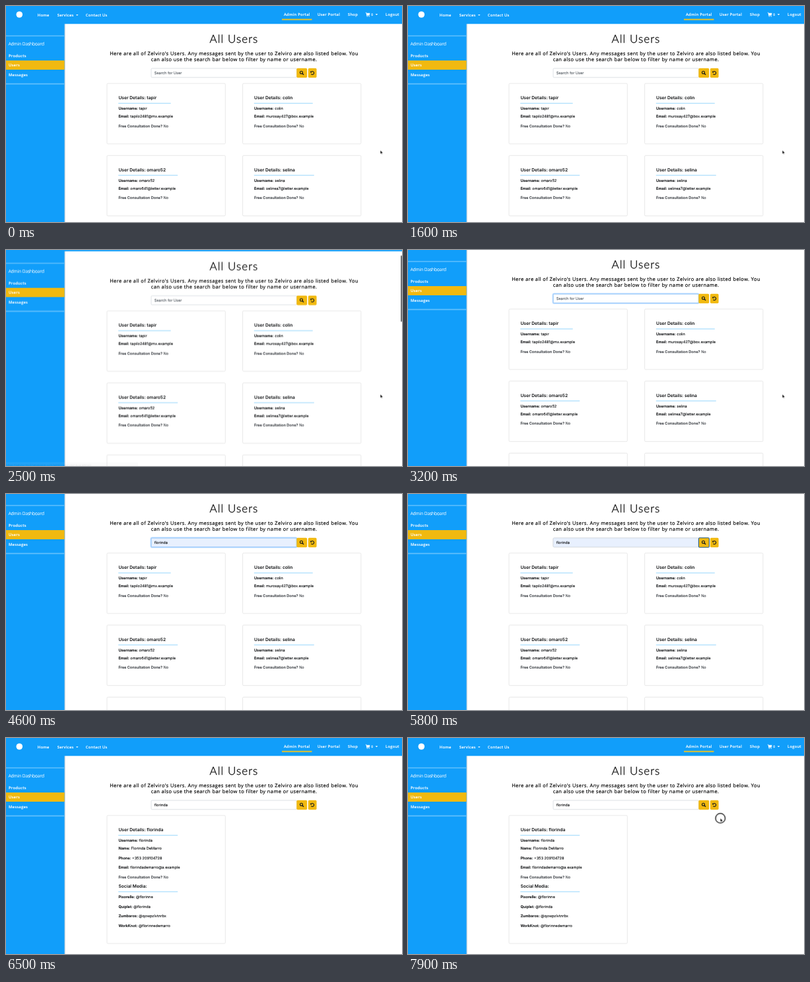
Animation of 600x329 px, one loop 8 s. Source, as an HTML page:

```html
<!DOCTYPE html>
<html lang="en">
<head>
<meta charset="utf-8">
<title>All Users</title>
<style>
  html, body { margin: 0; width: 100%; height: 100%; overflow: hidden; background: #fff; }
  svg { display: block; width: 600px; height: 329px; color: #0c0e10; }
  text {
    font: 5.62px Inter, sans-serif; text-rendering: geometricPrecision;
    fill: currentColor; stroke: currentColor; stroke-width: .1;
  }

  .nav, .side { color: #fff; }
  .nav text, .side text { font: 600 5.83px "Open Sans", sans-serif; letter-spacing: .23px; }
  .side .head { font-weight: 300; font-size: 6.67px; letter-spacing: 0; stroke-width: .18; }
  .nav .count { font-size: 5px; }
  .title { font: 300 17px Lato, sans-serif; letter-spacing: 1.05px; color: #000; stroke-width: .3; text-anchor: middle; }
  .intro { font: 7.5px "Open Sans", sans-serif; letter-spacing: .4px; color: #000; stroke-width: .16; text-anchor: middle; }
  .card rect { fill: #fff; stroke: #dfdfdf; stroke-width: .7; }
  .card line { stroke: #7accfb; stroke-width: .8; }
  .card .h { font-size: 6.7px; font-weight: 600; stroke-width: 0; }
  .b { font-weight: 600; }
  .muted { color: #3d4046; }
  .hint { color: #565d64; }
  .url { font-size: 4.2px; color: #333; }

  .anim, .anim * { animation-duration: 8s; animation-iteration-count: infinite; }
  .step { animation-timing-function: step-end; }
  #page { animation-name: scroll; }
  #thumb { animation-name: thumb; }
  #bar { animation-name: bar; }
  #status { animation-name: status; }
  #list { animation-name: list; }
  #single { animation-name: single; }
  #hint { animation-name: hint; }
  #one { animation-name: one; }
  #two { animation-name: two; }
  #full { animation-name: full; }
  #autofill { animation-name: autofill; }
  #focus { animation-name: focus; }
  #pressed { animation-name: pressed; }
  #pointer { animation-name: pointer; }
  #move { animation-name: move; }
  #ring { animation-name: ring; }

  @keyframes scroll {
    0%, 24.6% { transform: translateY(0); animation-timing-function: ease-in-out; }
    33.1% { transform: translateY(-28px); }
    75% { transform: translateY(-28px); animation-timing-function: step-start; }
    75.01%, 100% { transform: translateY(0); }
  }
  @keyframes thumb {
    0%, 24.6% { transform: translateY(0); animation-timing-function: ease-in-out; }
    33.1%, 100% { transform: translateY(8.6px); }
  }
  @keyframes bar {
    0% { opacity: 0; animation-timing-function: step-end; }
    23.75%, 36% { opacity: 1; }
    39%, 100% { opacity: 0; }
  }
  @keyframes status {
    0% { opacity: 0; animation-timing-function: step-end; }
    23.75%, 29% { opacity: 1; }
    32.5%, 100% { opacity: 0; }
  }
  @keyframes list { 0% { opacity: 1; } 75%, 100% { opacity: 0; } }
  @keyframes single { 0% { opacity: 0; } 75%, 100% { opacity: 1; } }
  @keyframes hint { 0% { opacity: 1; } 46.25%, 100% { opacity: 0; } }
  @keyframes one { 0% { opacity: 0; } 46.25% { opacity: 1; } 50%, 100% { opacity: 0; } }
  @keyframes two { 0% { opacity: 0; } 50% { opacity: 1; } 56.25%, 100% { opacity: 0; } }
  @keyframes full { 0% { opacity: 0; } 56.25%, 100% { opacity: 1; } }
  @keyframes autofill { 0% { opacity: 0; } 56.25% { opacity: 1; } 75%, 100% { opacity: 0; } }
  @keyframes focus {
    0%, 35% { opacity: 0; }
    36.9%, 71.2% { opacity: 1; }
    72.4%, 100% { opacity: 0; }
  }
  @keyframes pressed { 0% { opacity: 0; } 71.25% { opacity: 1; } 75%, 100% { opacity: 0; } }
  @keyframes pointer { 0% { opacity: 1; } 46.25% { opacity: 0; } 88%, 100% { opacity: 1; } }
  @keyframes ring { 0% { opacity: 0; } 88%, 100% { opacity: 1; } }
  @keyframes move {
    0%, 88.5% { transform: translate(567.2px, 219.8px); animation-timing-function: cubic-bezier(.3, 0, .3, 1); }
    98.5%, 100% { transform: translate(473.3px, 122.2px); }
  }
</style>
</head>
<body>
<svg class="anim" viewBox="0 0 600 329">
  <defs>
    <linearGradient id="shade">
      <stop stop-color="#9fb4c4"/>
      <stop offset="1" stop-color="#fff"/>
    </linearGradient>
  </defs>
  <g id="page">
    <g class="side">
      <rect x="88.5" width="2" height="500" fill="url(#shade)"/>
      <rect width="88.6" height="500" fill="#119efa"/>
      <path d="M0 45.5H88.6M0 118.7H88.6" stroke="#62c0fc" stroke-width="1.7"/>
      <rect y="83" width="88.6" height="14" fill="#f1b910"/>
      <text class="head" x="3.8" y="60">Admin Dashboard</text>
      <text x="4" y="78">Products</text>
      <text x="4" y="92.3">Users</text>
      <text x="4" y="106.8">Messages</text>
    </g>

    <g class="nav">
      <rect width="600" height="27.3" fill="#119efa"/>
      <circle cx="20.3" cy="13" r="4.8" fill="#fff"/>
      <text x="47.8" y="15.8">Home</text>
      <text x="77.8" y="15.8">Services</text>
      <text x="120.8" y="15.8">Contact Us</text>
      <text x="421" y="14.9">Admin Portal</text>
      <text x="472" y="14.9">User Portal</text>
      <text x="518" y="14.9">Shop</text>
      <text class="count" x="553.3" y="14.9">0</text>
      <text x="575" y="14.9">Logout</text>
      <path d="M106 12.9h3.6l-1.8 1.9zM559.7 12h3.6l-1.8 1.9z" fill="#fff"/>
      <path d="M544.8 9.8h1.3l.3 1h5.1l-.8 3.1h-3.6l.1.7h3.5v.7h-4.2l-.9-4.7h-.8z" fill="#fff"/>
      <path d="M547.2 15.8h.1M550.2 15.8h.1" stroke="#fff" stroke-width="1.2" stroke-linecap="round"/>
      <rect x="418" y="19.6" width="45.5" height="1.9" fill="#f3c41c"/>
    </g>

    <text class="title" x="345.5" y="56">All Users</text>
    <text class="intro" x="345.6" y="75.4">Here are all of Zelviro's Users. Any messages sent by the user to Zelviro are also listed below. You</text>
    <text class="intro" x="345.6" y="84.2">can also use the search bar below to filter by name or username.</text>

    <rect x="220" y="95" width="220.5" height="13.8" rx="1.4" fill="#fff" stroke="#ced4da" stroke-width=".7"/>
    <rect id="autofill" class="step" x="220" y="95" width="220.5" height="13.8" rx="1.4" fill="#e8f0fe" stroke="#ced4da" stroke-width=".7"/>
    <g id="focus" fill="none">
      <rect x="219.4" y="94.4" width="221.4" height="15" rx="2" stroke="#bfdeff" stroke-width="1.6"/>
      <rect x="220" y="95" width="220.2" height="13.8" rx="1.4" stroke="#80bdff" stroke-width=".7"/>
    </g>
    <text id="hint" class="step hint" x="224.7" y="104">Search for User</text>
    <text id="one" class="step" x="224.7" y="104">f</text>
    <text id="two" class="step" x="224.7" y="104">fl</text>
    <text id="full" class="step" x="224.7" y="104">florinda</text>

    <g fill="#f1b910">
      <rect x="440.3" y="94.8" width="15.9" height="14.4" rx="1.6"/>
      <rect x="457.9" y="94.8" width="12.7" height="14.4" rx="1.6"/>
    </g>
    <rect id="pressed" class="step" x="440.4" y="94.8" width="16" height="14.4" rx="1.4" fill="none" stroke="#255f90" stroke-width="1.1"/>
    <g fill="none" stroke="#16191c" stroke-width="1.1">
      <circle cx="447.5" cy="101.3" r="2"/>
      <path d="M449 102.8l2 2" stroke-width="1.4"/>
      <path d="M462.1 100.6A2.5 2.5 0 1 1 462.3 103.7"/>
      <path d="M461.2 99v2.5h2.5z" fill="#16191c" stroke="none"/>
    </g>

    <g id="list" class="step"></g>
    <g id="single" class="step"></g>
  </g>

  <g id="status">
    <path d="M0 323.2H198.5Q200 323.2 200 324.7V329H0Z" fill="#d6d9dc"/>
    <text class="url" x="0.3" y="328.8">https://zelviro-ms4.herokuapp.com/admin-user-dashboard#main</text>
  </g>
  <g id="bar">
    <rect id="thumb" x="598" y="0.6" width="2" height="101" rx="1" fill="#6f7275"/>
  </g>

  <g id="pointer" class="step">
    <g id="move">
      <circle id="ring" class="step" r="7.3" fill="none" stroke="#111" stroke-width="1.3"/>
      <path d="M0 0V5.4L1.2 4.3L2 6.1L2.9 5.7L2.1 4H3.8Z" fill="#000" stroke="#fff" stroke-width=".4"/>
    </g>
  </g>
</svg>

<script>
  const COLS = [153, 358.6], ROW = 109.7, TOP = 118;

  const field = (y, label, value, cls = '') =>
    `<text class="${cls}" x="17.4" y="${y}"><tspan class="b">${label}</tspan> ${value}</text>`;

  const heading = (y, text, width) =>
    `<text class="h" x="17.4" y="${y}">${text}</text>
     <line x1="17.2" x2="${17.2 + width}" y1="${y + 5.8}" y2="${y + 5.8}"/>`;

  const card = (x, y, height, body) =>
    `<g class="card" transform="translate(${x} ${y})">
       <rect width="179.3" height="${height}" rx="1.4"/>${body}</g>`;

  const users = [
    ['tapir', 'tapilo2481@mx.example', 79.5],
    ['colin', 'murosay427@box.example', 89],
    ['omaro52', 'omaro641@letter.example', 90],
    ['selina', 'selinea7@letter.example', 91],
    null, null
  ];

  const summary = ([name, email, width]) =>
    heading(24.4, `User Details: ${name}`, width) +
    field(40.3, 'Username:', name) +
    field(52, 'Email:', email) +
    field(66.5, 'Free Consultation Done?', 'No', 'muted');

  document.getElementById('list').innerHTML = users.map((user, i) =>
    card(COLS[i % 2], TOP + ROW * (i >> 1), 92, user ? summary(user) : '')).join('');

  document.getElementById('single').innerHTML = card(COLS[0], TOP, 195,
    heading(24.4, 'User Details: florinda', 90) +
    field(40.3, 'Username:', 'florinda') +
    field(52, 'Name:', 'Florinda DeMarro') +
    field(66.5, 'Phone:', '+353 209104728') +
    field(81, 'Email:', 'florindademarro@a.example') +
    field(95.5, 'Free Consultation Done?', 'No', 'muted') +
    heading(110.3, 'Social Media:', 90) +
    field(126.4, 'Pixorelle:', '@florinne') +
    field(140.9, 'Quiplet:', '@florinda') +
    field(155.3, 'Zumbaros:', '@qowpzlvtnrbx') +
    field(169.6, 'WorkKnot:', '@florinnedemarro'));
</script>
</body>
</html>
```
